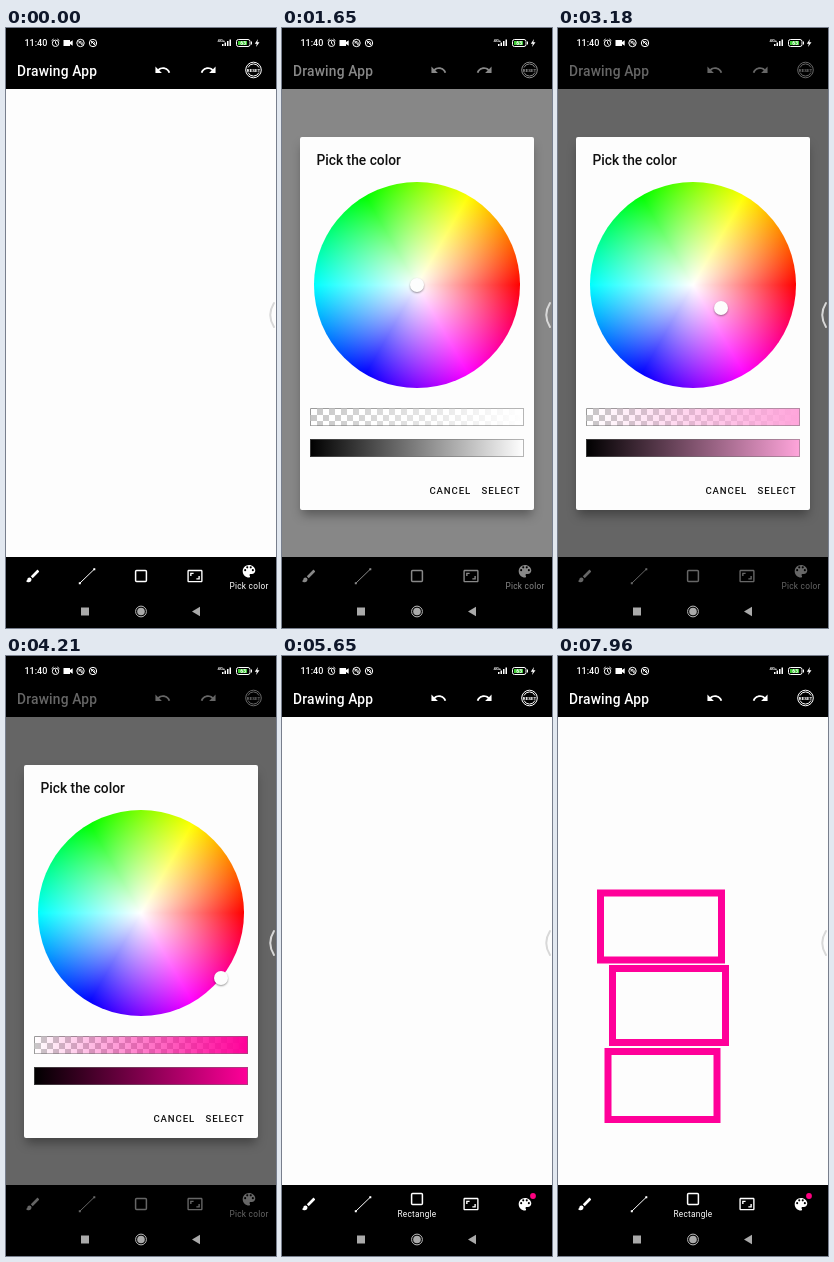
Animation of 270 by 600 pixels, one loop 8000 ms. Source, as an HTML page:

```html
<!DOCTYPE html>
<html lang="en">
<head>
<meta charset="utf-8">
<title>Drawing app</title>
<style>
html, body { margin: 0; width: 100%; height: 100%; overflow: hidden; background: #000; }
#stage { position: relative; width: 270px; height: 600px; overflow: hidden; font-family: Roboto, sans-serif; }
#stage > *, .wheel, .bar, #thumb { position: absolute; }
svg { left: 0; top: 0; width: 270px; height: 600px; }
text { fill: #fff; }
.title { font-size: 13.75px; font-weight: 500; }
.label { font-size: 8.25px; letter-spacing: .27px; text-anchor: middle; }
.line { fill: none; stroke: #fff; }
#dim { inset: 0; background: #000; }
#dialog { left: 18px; top: 109px; width: 234px; height: 372.5px; border-radius: 2px;
  background: #fdfdfd; box-shadow: 0 7px 10px -2px rgba(0,0,0,.35); }
#dialog span { position: absolute; line-height: 16px; white-space: nowrap; color: #111; }
#dialog .button { top: 346px; font-size: 9.6px; font-weight: 500; letter-spacing: .86px; }
.wheel { left: 14px; top: 44.5px; width: 206px; height: 206px; border-radius: 50%;
  background: radial-gradient(circle closest-side, #fff, #fff0),
    conic-gradient(from 90deg, #f00, #f0f, #00f, #0ff, #0f0, #ff0, #f00); }
#thumb { width: 14px; height: 14px; margin: -7px; border-radius: 50%; background: #fdfdfd;
  box-shadow: 0 1px 2px rgba(0,0,0,.4); }
.bar { left: 10px; width: 214px; height: 18px; box-sizing: border-box; border: 1px solid rgba(110,110,110,.5); }
#press { left: 176px; top: 341px; width: 50px; height: 25px; position: absolute; border-radius: 3px; background: #000; }
</style>
</head>
<body>
<div id="stage">
  <svg>
    <rect width="270" height="600"/>
    <rect y="61" width="270" height="468" fill="#fdfdfd"/>
    <g id="shapes" fill="none" stroke="#ff0099" stroke-width="7"></g>
    <text class="title" x="11" y="47.5" letter-spacing=".2">Drawing App</text>
    <g fill="#fff">
      <path id="undo" transform="translate(148 33.5) scale(.72)" d="M12.5 8c-2.65 0-5.05.99-6.9 2.6L2 7v9h9l-3.62-3.62c1.39-1.16 3.16-1.88 5.12-1.88 3.54 0 6.55 2.31 7.6 5.5l2.37-.78C21.08 11.03 17.15 8 12.5 8z"/>
      <use href="#undo" transform="translate(359 0) scale(-1 1)"/>
    </g>
    <circle class="line" cx="247.5" cy="42" r="7.8"/>
    <path class="line" d="M242 39.5a6 6 0 0 1 11 0M242 44.5a6 6 0 0 0 11 0"/>
    <text x="247.5" y="43.6" font-size="4.4" font-weight="900" text-anchor="middle">RESET</text>

    <path fill="#fff" transform="translate(18.6 539.8) scale(.69)" d="M7 14c-1.66 0-3 1.34-3 3 0 1.31-1.16 2-2 2 .92 1.22 2.49 2 4 2 2.21 0 4-1.79 4-4 0-1.66-1.34-3-3-3zm13.71-9.37l-1.34-1.34c-.39-.39-1.02-.39-1.41 0L9 12.25 11.75 15l8.96-8.96c.39-.39.39-1.02 0-1.41z"/>
    <path class="line" d="M73.5 555.5L88.5 541"/>
    <path fill="#fff" d="M72.8 554.2h2v2h-2zM87.3 540.2h2v2h-2z"/>
    <g id="rectangleIcon"><rect class="line" x="129.6" y="542.6" width="10.8" height="10.8" rx="1" stroke-width="1.5"/></g>
    <path fill="#fff" transform="translate(180.7 539.8) scale(.69)" d="M19 12h-2v3h-3v2h5v-5zM7 9h3V7H5v5h2V9zm14-6H3c-1.1 0-2 .9-2 2v14c0 1.1.9 2 2 2h18c1.1 0 2-.9 2-2V5c0-1.1-.9-2-2-2zm0 16.01H3V4.99h18v14.02z"/>
    <g id="paletteIcon">
      <g transform="translate(234.6 539.8) scale(.7)">
        <path fill="#fff" d="M12 3c-4.97 0-9 4.03-9 9s4.03 9 9 9c.83 0 1.5-.67 1.5-1.5 0-.39-.15-.74-.39-1.01-.23-.26-.38-.61-.38-.99 0-.83.67-1.5 1.5-1.5H16c2.76 0 5-2.24 5-5 0-4.42-4.03-8-9-8z"/>
        <circle cx="6.5" cy="10.5" r="1.5"/><circle cx="9.5" cy="6.5" r="1.5"/>
        <circle cx="14.5" cy="6.5" r="1.5"/><circle cx="17.5" cy="10.5" r="1.5"/>
      </g>
      <circle id="badge" cx="251" cy="540" r="2.9" fill="#ff0080"/>
    </g>
    <text class="label" id="rectangleLabel" x="135" y="560.7">Rectangle</text>
    <text class="label" id="paletteLabel" x="243" y="560.7">Pick color</text>
  </svg>

  <div id="dim"></div>

  <div id="dialog">
    <span class="title" style="left:16.5px;top:14.5px">Pick the color</span>
    <div class="wheel"></div>
    <div id="thumb"></div>
    <div class="bar" id="alphaBar" style="top:271px"></div>
    <div class="bar" id="valueBar" style="top:302px"></div>
    <div id="press"></div>
    <span class="button" style="left:129.5px">CANCEL</span>
    <span class="button" style="left:181.5px">SELECT</span>
  </div>

  <svg>
    <text x="18.5" y="18.3" font-size="9" font-weight="500">11:40</text>
    <g class="line">
      <circle cx="49.5" cy="15.3" r="3.2"/>
      <path d="M49.5 13.3v2.2l1.5 1M45.6 12.7l2-1.7M53.4 12.7l-2-1.7"/>
      <g id="muted"><circle cx="74.5" cy="15" r="3.7"/><path d="M72 12.5l5 5M73 15.5a1.6 1.6 0 1 1 2.5 1"/></g>
      <use href="#muted" x="12.5"/>
    </g>
    <path fill="#fff" d="M57.5 12H64v2l2.7-1.8v5.6L64 16v2h-6.5z"/>
    <text x="211.5" y="13.8" font-size="4.2" font-weight="700">4G+</text>
    <path fill="#fff" d="M216 16h1.500v2H216zM218.500 14.500h1.500v3.500h-1.500zM221 13h1.500v5H221zM223.500 11.500h1.500v6.500h-1.500z"/>
    <rect class="line" x="230.5" y="11.5" width="13.5" height="7" rx="2"/>
    <rect x="232" y="13" width="9" height="4" fill="#3fc936"/>
    <text x="237.2" y="17" font-size="5" font-weight="700" text-anchor="middle">63</text>
    <path fill="#fff" d="M245 13.5h1v3h-1zM252 11l-3.2 4.7h2l-.8 3.3 3.5-4.8h-2.2z"/>
    <path d="M268 275Q260.5 287 268 299" fill="none" stroke="#d8d8d8" stroke-width="2" stroke-linecap="round"/>
    <rect x="75" y="579.5" width="8" height="8" fill="#aaa"/>
    <circle cx="135" cy="583.5" r="5.4" fill="none" stroke="#bbb"/>
    <circle cx="135" cy="583.5" r="3.8" fill="#aaa"/>
    <path d="M186 583.5l8-4.700v9.400z" fill="#aaa"/>
  </svg>
</div>
<script>
const LOOP = 8000;
const $ = id => document.getElementById(id);
const ramp = (t, from, to) => Math.min(1, Math.max(0, (t - from) / (to - from)));
const smooth = p => p * p * (3 - 2 * p);

// Each box grows up and to the right from its lower left corner.
const boxes = [
  { x: 42.5, y: 304, w: 121, h: 67, start: 6635 },
  { x: 54.5, y: 386.5, w: 113, h: 74, start: 6720 },
  { x: 50, y: 463.5, w: 109, h: 68, start: 6725 }
].map(box => {
  const el = document.createElementNS('http://www.w3.org/2000/svg', 'rect');
  $('shapes').append(el);
  return { ...box, el };
});

function drawBoxes(t) {
  for (const { el, x, y, w, h, start } of boxes) {
    const grow = 1 - Math.pow(1 - ramp(t, start, 7960), 1.45);
    el.style.display = grow > 0 ? '' : 'none';
    el.setAttribute('x', x);
    el.setAttribute('y', y - h * grow);
    el.setAttribute('width', w * grow);
    el.setAttribute('height', h * grow);
  }
}

function drawDialog(t) {
  const closing = ramp(t, 4720, 4920);
  const shown = ramp(t, 1480, 1630) * (1 - closing);
  $('dim').style.opacity = .6 * ramp(t, 1480, 1700) * (1 - closing);
  $('dialog').style.opacity = shown;
  $('dialog').style.transform = `scale(${closing ? 1 : .92 + .08 * shown})`;
  $('press').style.opacity = .12 * ramp(t, 4600, 4680);

  const drag = smooth(ramp(t, 2700, 3900));
  $('thumb').style.left = 116.6 + 80.6 * drag + 'px';
  $('thumb').style.top = 148 + 64.5 * drag + 'px';
  const rgb = `255, ${255 * (1 - drag)}, ${255 - 102 * drag}`;
  $('alphaBar').style.background =
    `linear-gradient(90deg, rgba(${rgb}, 0), rgb(${rgb})) border-box,
     repeating-conic-gradient(#c8c8c8 0 25%, #fff 0 50%) 0 0 / 12px 12px`;
  $('valueBar').style.background = `linear-gradient(90deg, #000, rgb(${rgb})) border-box`;
}

function drawNavigation(t) {
  const chosen = smooth(ramp(t, 5120, 5320));
  $('rectangleIcon').setAttribute('transform', `translate(0 ${-5 * chosen})`);
  $('paletteIcon').setAttribute('transform', `translate(0 ${-5 * (1 - chosen)})`);
  $('rectangleLabel').style.opacity = chosen;
  $('paletteLabel').style.opacity = 1 - chosen;
  $('badge').style.opacity = t >= 4720 ? 1 : 0;
}

const start = performance.now();
function draw() {
  const t = (performance.now() - start) % LOOP;
  drawBoxes(t);
  drawDialog(t);
  drawNavigation(t);
  requestAnimationFrame(draw);
}
draw();
</script>
</body>
</html>
```
